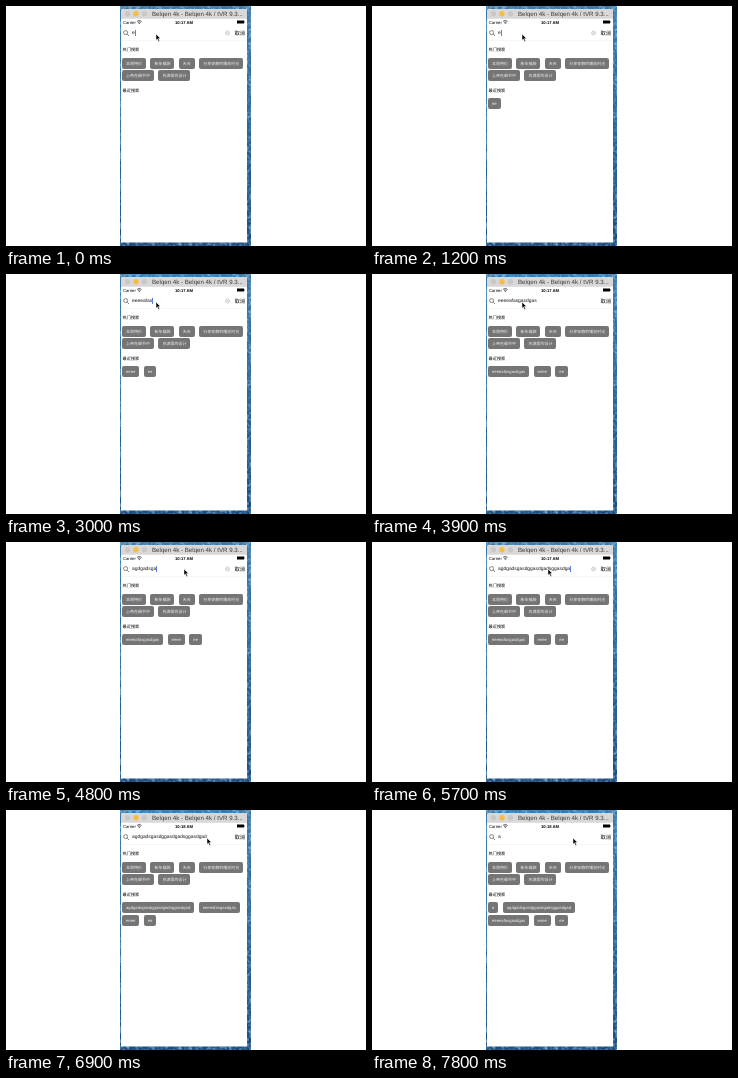
An HTML page that plays this animation: 360x240 px, repeating every 8 s.

```html
<!DOCTYPE html>
<html lang="zh-CN">
<head>
<meta charset="utf-8">
<title>Search history</title>
<style>
html, body { margin: 0; width: 100%; height: 100%; overflow: hidden; background: #fff; }
#stage {
  position: relative; width: 360px; height: 240px; overflow: hidden; color: #1a1a1a;
  font-family: "Liberation Sans", "Noto Sans CJK SC", "Noto Sans CJK", sans-serif;
  text-rendering: geometricPrecision;
}
svg { position: absolute; left: 0; top: 0; }
.tags {
  position: absolute; left: 116px; width: 123px;
  display: flex; flex-wrap: wrap; gap: 1.6px 4.4px;
}
.tags span {
  height: 11px; padding: 0 4px; border-radius: 2px;
  background: #757575; color: #eee; font-size: 4px; line-height: 11.4px; white-space: nowrap;
}
#recent span { font-size: 4.22px; }
#field { position: absolute; left: 126px; top: 24px; font-size: 4.9px; line-height: 8px; white-space: nowrap; }
#field.editing::after {
  content: ""; position: absolute; right: -1px; top: 0; width: 1px; height: 6px; background: #5b80e0;
}
</style>
</head>
<body>
<div id="stage">
  <svg width="360" height="240">
    <defs>
      <linearGradient id="sea" x2="0" y2="1">
        <stop offset="0" stop-color="#3a7aab"/>
        <stop offset=".5" stop-color="#27659a"/>
        <stop offset="1" stop-color="#1b4d7e"/>
      </linearGradient>
      <filter id="ripple" x="0" y="0" width="1" height="1">
        <feTurbulence type="fractalNoise" baseFrequency=".3" numOctaves="2" seed="4"/>
        <feColorMatrix values="0 0 0 0 .5  0 0 0 0 .75  0 0 0 0 .9  1.500 0 0 0 -.65"/>
      </filter>
    </defs>
    <rect x="114" width="131" height="240" fill="url(#sea)"/>
    <rect x="114" width="131" height="240" filter="url(#ripple)"/>
    <path d="M115 236.500V5q0-2 2-2h122q2 0 2 2v231.500z" fill="#fff"/>
    <path d="M115 12.800V5q0-2 2-2h122q2 0 2 2v7.800z" fill="#d9d7d7"/>
    <circle cx="121.500" cy="7.700" r="2.700" fill="#cbc7c6"/>
    <circle cx="130" cy="7.700" r="2.700" fill="#f6bd45"/>
    <circle cx="138.500" cy="7.700" r="2.700" fill="#c8c8c8"/>
    <text x="146" y="10" font-size="6.15" fill="#3a3a3a">Belqen 4k - Belqen 4k / tVR 9.3...</text>

    <text x="117" y="17.700" font-size="4.2">Carrier</text>
    <g fill="none" stroke="#222" stroke-width=".7">
      <path d="M131 15.400q2.300-2 4.600 0M132 16.500q1.300-1.200 2.600 0"/>
      <circle cx="133.300" cy="17.400" r=".3"/>
    </g>
    <text id="clock" x="178" y="17.700" font-size="4.2" font-weight="bold" text-anchor="middle"></text>
    <path d="M231 14.500h7v3h-7zM238.300 15.400h.7v1.200h-.7z"/>

    <g fill="none" stroke="#666" stroke-width=".8">
      <circle cx="119.600" cy="26.600" r="2"/>
      <path d="M121.200 28.200l1.800 1.800"/>
    </g>
    <g id="clear" fill="none" stroke="#b0b0b0" stroke-width=".6">
      <circle cx="221.500" cy="27" r="2"/>
      <path d="M220.700 26.200l1.600 1.600m0-1.600l-1.600 1.600"/>
    </g>
    <text x="228.500" y="29" font-size="5.3">取消</text>
    <path d="M115 34.500h126" stroke="#f7f7f7"/>
    <text x="116.500" y="45.300" font-size="4.2">热门搜索</text>
    <text x="116.500" y="85.600" font-size="4.2">最近搜索</text>
  </svg>

  <div class="tags" style="top:51.800px">
    <span>本周特价</span><span>新年福袋</span><span>天天</span><span>分享安静的睡前时光</span>
    <span>上帝在细节中</span><span>充满爱的设计</span>
  </div>
  <div class="tags" id="recent" style="top:92.200px"></div>
  <div id="field"></div>

  <svg width="360" height="240">
    <path id="mouse" d="M0 0v6.200l1.400-1.300 1.100 2.500 1.100-.5-1.100-2.400h2z" fill="#000" stroke="#fff" stroke-width=".5"/>
  </svg>
</div>
<script>
const STEP = 300, LOOP = 8000;
const LONG = "agdgadsgasdggasdgadsggasdgad", MID = "eeeeafasgasdgas";
const typing = (text, ...lengths) => lengths.map(n => ({ text: text.slice(0, n), editing: true }));
const search = (text, count) => Array(count).fill({ text, editing: false });

const steps = [
  ...typing("ee", 1, 2), ...search("ee", 2),
  ...typing("eeee", 1, 3, 4), ...search("eeee", 2),
  ...typing(MID, 4, 8, 11, 15), ...search(MID, 2),
  ...typing(LONG, 4, 9, 15, 21, 27, 28), ...search(LONG, 3),
  ...typing("a", 0, 1), ...search("a", 1)
];
// first step, x, y
const moves = [[0, 150, 28], [14, 178, 27], [18, 176, 27], [21, 201, 28]];
const $ = id => document.getElementById(id);
let shown = -1;

function draw(i) {
  const { text, editing } = steps[i];
  const done = steps.slice(0, i + 1).filter(s => !s.editing).map(s => s.text);
  $("field").textContent = text;
  $("field").className = editing ? "editing" : "";
  $("clear").style.display = editing && text ? "" : "none";
  $("clock").textContent = i < 22 ? "10:17 AM" : "10:18 AM";
  $("recent").replaceChildren(...[...new Set(done)].reverse().map(word => {
    const tag = document.createElement("span");
    tag.textContent = word;
    return tag;
  }));
  const [, x, y] = moves.filter(m => m[0] <= i).pop();
  $("mouse").setAttribute("transform", `translate(${x} ${y})`);
}

function tick() {
  const i = Math.min(steps.length - 1, Math.floor(performance.now() % LOOP / STEP));
  if (i !== shown) draw(shown = i);
  requestAnimationFrame(tick);
}
tick();
</script>
</body>
</html>
```
